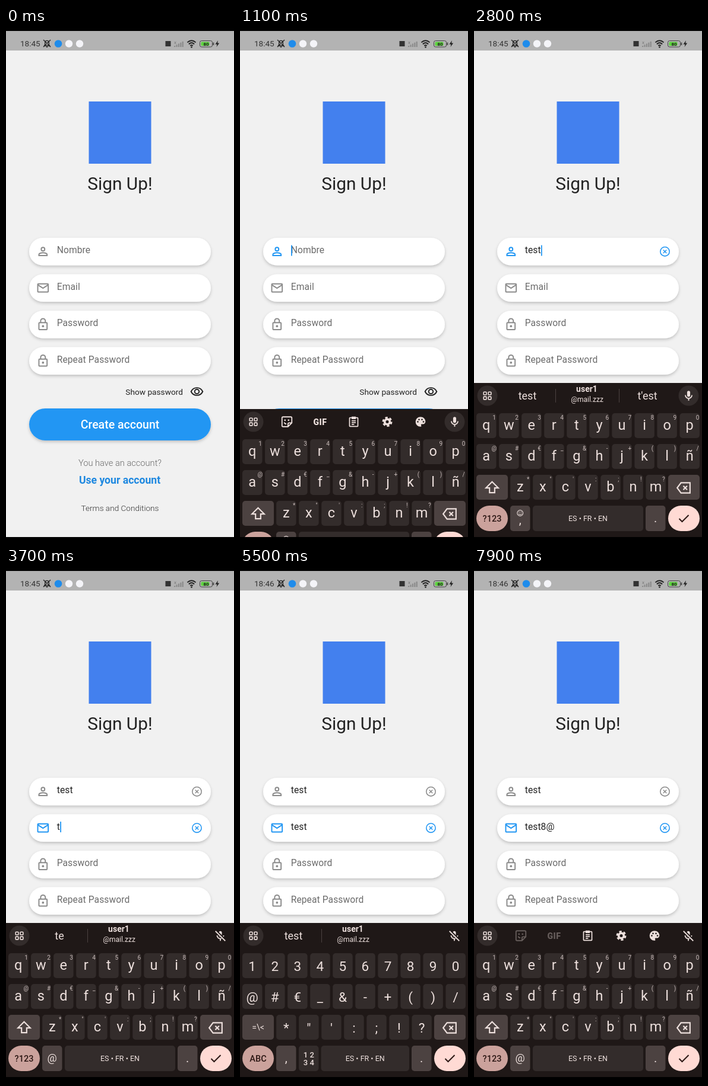
These frames come from a looping animation (384 by 864 pixels, 8 s). An HTML page:

```html
<!DOCTYPE html>
<html lang="en">
<head>
<meta charset="utf-8">
<title>Sign up</title>
<style>
html, body { margin: 0; width: 100%; height: 100%; overflow: hidden; background: #000; }
svg { display: block; width: 384px; height: 864px; font-family: Roboto, "Noto Sans", sans-serif; }
</style>
</head>
<body>
<svg id="stage" viewBox="0 0 384 864"></svg>
<script>
const stage = document.getElementById('stage');
const pen = document.createElement('canvas').getContext('2d');
const BLUE = '#2196f3', GREY = '#8b8b8b', INK = '#222', LIGHT = '#ede0dd';
const KEY = '#332c2b', MOD = '#4c4241', PRESSED = '#5a504e', BOARD = '#1f1817';
const LOOP = 8000, STEP = 100, SPACING = .1;

// Typed characters per field, with the time each one appears
const fields = [
  { hint: 'Nombre', icon: 'person', focus: 800, typed: [[1900, 't'], [2100, 'e'], [2300, 's'], [2600, 't']] },
  { hint: 'Email', icon: 'mail', focus: 3200, typed: [[3700, 't'], [3900, 'e'], [4200, 's'], [4600, 't'], [5900, '8'], [7000, '@']] },
  { hint: 'Password', icon: 'lock', focus: Infinity, typed: [] },
  { hint: 'Repeat Password', icon: 'lock', focus: Infinity, typed: [] }
];
const SYMBOLS_ON = 5100, SYMBOLS_OFF = 7400, CLOCK_TICK = 4600;
const presses = [...fields.flatMap(f => f.typed), [SYMBOLS_ON, '?123'], [SYMBOLS_OFF, 'ABC']];

const dot = (x, y, r) => `<circle cx="${x}" cy="${y}" r="${r}" fill="currentColor" stroke="none"/>`;
const MIC = '<rect x="9.2" y="3" width="5.6" height="11" rx="2.8" fill="currentColor" stroke="none"/><path d="M6 11a6 6 0 0 0 12 0M12 17v4"/>';
const icons = {
  person: '<circle cx="12" cy="8" r="3"/><path d="M5 19v-2c0-1.7 4-3 7-3s7 1.3 7 3v2z"/>',
  mail: '<rect x="3" y="5" width="18" height="14" rx="1"/><path d="M3 6.5l9 6 9-6"/>',
  lock: '<rect x="5" y="9" width="14" height="12" rx="1"/><path d="M8 9V6a4 4 0 0 1 8 0v3"/>' + dot(12, 15, 1.9),
  clear: '<circle cx="12" cy="12" r="8.4"/><path d="M9 9l6 6m0-6l-6 6"/>',
  eye: '<path d="M2 12c4-8.7 16-8.7 20 0-4 8.7-16 8.7-20 0z"/><circle cx="12" cy="12" r="3.8"/>',
  bell: '<path d="M5 18h14l-2-3v-5a5 5 0 0 0-10 0v5zM10 21h4M3 3l18 18M21 3L3 21"/>',
  wifi: '<path d="M2 9q10-9 20 0M5.5 13q6.5-6 13 0M9 17q3-3 6 0" stroke-width="2.8"/>' + dot(12, 20, 1.8),
  grid: [4, 14].map(x => [4, 14].map(y => `<rect x="${x}" y="${y}" width="6" height="6" rx="1"/>`).join('')).join(''),
  sticker: '<path d="M5 3h14a2 2 0 0 1 2 2v9l-7 7H5a2 2 0 0 1-2-2V5a2 2 0 0 1 2-2zM14 21v-5a2 2 0 0 1 2-2h5M7 13q1 3 4 3"/>' + dot(8.5, 9, 1.5) + dot(15, 9, 1.5),
  clipboard: '<rect x="4" y="4" width="16" height="17" rx="1"/><path d="M8 10h8M8 13.5h8M8 17h5"/><rect x="8" y="2" width="8" height="5" fill="currentColor" stroke="none"/>',
  gear: '<circle cx="12" cy="12" r="5.2" stroke-width="4.4"/><circle cx="12" cy="12" r="8.5" stroke-width="3.4" stroke-dasharray="5 3.9"/>',
  palette: '<path fill="currentColor" stroke="none" d="M12 2a10 10 0 0 0 0 20c1 0 1.7-.8 1.7-1.7 0-1-.7-1.2-.7-2 0-.9.7-1.6 1.6-1.6H17a5 5 0 0 0 5-5C22 6 17.5 2 12 2z"/>'
    + `<g color="${BOARD}">` + dot(6.5, 12, 1.6) + dot(9, 7.5, 1.6) + dot(15, 7.5, 1.6) + dot(18, 12, 1.6) + '</g>',
  mic: MIC,
  micOff: MIC + `<path d="M3 2l19 19" stroke="${BOARD}" stroke-width="5"/><path d="M3 3l18 18"/>`,
  shift: '<path d="M12 3L2.5 12.5H8V20h8v-7.5h5.5z"/>',
  erase: '<path d="M8 4h14v16H8l-6-8zM11.5 9l6 6m0-6l-6 6"/>',
  check: '<path d="M4 12l5 5L20 6"/>',
  smile: '<circle cx="12" cy="12" r="9"/><path d="M7 14q5 5 10 0"/>' + dot(9, 9, 1.4) + dot(15, 9, 1.4)
};

const esc = s => s.replace(/&/g, '&amp;').replace(/</g, '&lt;');
const rect = (x, y, w, h, fill, r = 0, extra = '') =>
  `<rect x="${x}" y="${y}" width="${w}" height="${h}" rx="${r}" fill="${fill}" ${extra}/>`;
const disc = (x, y, r, fill) => `<circle cx="${x}" cy="${y}" r="${r}" fill="${fill}"/>`;
const text = (s, x, y, size, fill, extra = '', anchor = 'middle') =>
  `<text x="${x}" y="${y}" font-size="${size}" fill="${fill}" text-anchor="${anchor}" ${extra}>${esc(s)}</text>`;
const icon = (name, x, y, size, color, width = 2) =>
  `<g transform="translate(${x - size / 2} ${y - size / 2}) scale(${size / 24})" fill="none" color="${color}" stroke="currentColor" stroke-width="${width}">${icons[name]}</g>`;

function statusBar(t) {
  let bars = '';
  for (let i = 0; i < 5; i++) bars += rect(283 + i * 3.4, 30 - i * 1.8, 2.2, 2 + i * 1.8, '#8b8b8b');
  return rect(0, 5, 384, 33, '#b3b3b3')
    + text(t < CLOCK_TICK ? '18:45' : '18:46', 24, 31, 13.5, '#333', '', 'start')
    + icon('bell', 69, 26, 16, INK)
    + disc(88, 26.5, 6.3, '#1f8ceb') + disc(106, 26.5, 6.2, '#f4f4f8') + disc(124, 26.5, 6.2, '#f4f4f8')
    + rect(268.5, 22, 9, 9, '#333')
    + bars + text('x', 285, 27, 8, '#777')
    + icon('wifi', 312.5, 26.5, 17, INK)
    + rect(326.5, 21.5, 21, 10.5, 'none', 3, 'stroke="#444"') + rect(328.5, 23.5, 14, 6.5, '#5bd33c', 1.5)
    + rect(348.5, 24.5, 1.8, 4.5, '#444') + text('80', 337, 29.8, 8, INK, 'font-weight="700"')
    + '<path d="M357 21l-4.5 6.5h3l-1 4.5 4.7-6.5h-3z" fill="#222"/>';
}

function field(f, i, t, active, value, lastEvent) {
  const y = 354 + i * 61.5, mid = y + 23.2, focused = f === active;
  const color = focused ? BLUE : GREY;
  let out = rect(39, y, 306, 46.6, '#fff', 23.3, 'filter="url(#soft)"')
    + icon(f.icon, 62.3, mid, 23.5, color)
    + text(value || f.hint, 85.7, y + 26.4, 15.6, value ? INK : '#6b6b6b', `letter-spacing="${SPACING}"`, 'start');
  if (value) out += icon('clear', 321.5, mid, 22, color, 1.7);
  if (focused && Math.floor((t - lastEvent) / 500) % 2 === 0) {
    pen.font = '15.6px Roboto, "Noto Sans", sans-serif';
    const end = 86 + pen.measureText(value).width + value.length * SPACING;
    out += rect(end, y + 12.5, 1.8, 18, BLUE);
  }
  return out;
}

function form(t, active, values, lastEvent) {
  return rect(0, 5, 384, 854, '#f1f1f1') + statusBar(t)
    + rect(139.5, 124, 105, 105, '#4380ee')
    + text('Sign Up!', 192, 273, 29.8, INK)
    + fields.map((f, i) => field(f, i, t, active, values[i], lastEvent)).join('')
    + text('Show password', 298, 618.5, 13.7, INK, '', 'end') + icon('eye', 321.5, 613.5, 23.5, INK)
    + rect(39, 642, 306, 54, BLUE, 27, 'filter="url(#soft)"')
    + text('Create account', 192, 676, 19.5, '#fff', 'font-weight="500"')
    + text('You have an account?', 192, 739, 14.65, '#6a6a6a', 'font-weight="300"')
    + text('Use your account', 191.5, 769, 17.6, '#1e88e0', 'font-weight="700"')
    + text('Terms and Conditions', 192, 815, 13.6, '#333', 'font-weight="300"');
}

function toolbar(email, value) {
  let out = disc(22.5, 620.5, 17, KEY) + icon('grid', 22.5, 620.5, 19, LIGHT);
  out += email ? icon('micOff', 361, 621, 22, LIGHT)
    : disc(361.5, 620.5, 17, KEY) + icon('mic', 361.5, 620.5, 22, LIGHT);
  if (!value || value.endsWith('@')) {
    const shade = email ? '#665d5b' : LIGHT;
    return out + icon('sticker', 79, 620.5, 22, shade)
      + text('GIF', 135, 625.5, 14, shade, 'font-weight="900" letter-spacing=".5"')
      + icon('clipboard', 191.5, 620.5, 21, LIGHT) + icon('gear', 248, 620.5, 20, LIGHT)
      + icon('palette', 304, 620.5, 20, LIGHT);
  }
  out += text(email && value === 't' ? 'te' : value, 90, 627, 18, LIGHT)
    + rect(137, 609, 1, 23, '#4a4241')
    + text('user1', 190, 613.5, 14, LIGHT, 'font-weight="700"')
    + text('@mail.zzz', 190.5, 630.5, 12, LIGHT);
  if (!email) out += rect(244, 609, 1, 23, '#4a4241') + text("t'est", 292, 627, 18, LIGHT);
  return out;
}

function keyboard(t, email, value) {
  const symbols = t >= SYMBOLS_ON && t < SYMBOLS_OFF;
  const hit = presses.find(p => t >= p[0] - STEP && t < p[0]);
  const down = hit && hit[1];
  const marks = ['1234567890', '@#€_&-+()/', '*"\':;!?'];
  const rows = symbols ? marks : ['qwertyuiop', 'asdfghjklñ', 'zxcvbnm'];
  let out = rect(0, 599, 384, 262, BOARD) + toolbar(email, value);
  rows.forEach((row, r) => [...row].forEach((c, i) => {
    const x = 4 + (r === 2 ? i + 1.5 : i) * 38.05, y = 650 + r * 52;
    out += rect(x, y, 33.5, 42, c === down ? PRESSED : KEY, 5)
      + text(c, x + 16.7, y + (symbols ? 29.5 : 28), symbols ? 22.5 : 23.5, LIGHT);
    if (!symbols) out += text(marks[r][i], x + 30, y + 11, 10, '#c9bcba');
  }));
  out += rect(4, 754, 53, 42, MOD, 5) + rect(327, 754, 53, 42, MOD, 5)
    + (symbols ? text('=\\<', 30.5, 780, 14, LIGHT) : icon('shift', 30.5, 775.5, 26, LIGHT))
    + icon('erase', 353, 776, 26, LIGHT);

  const mode = symbols ? 'ABC' : '?123', comma = symbols || !email;
  out += rect(4, 806, 53, 43, mode === down ? '#e6c3bd' : '#cba29c', 21.5)
    + text(mode, 30.5, 832.5, 14.5, '#2b1613', 'font-weight="500"')
    + rect(61, 806, 33.5, 43, MOD, 5)
    + (comma ? text(',', 77.7, symbols ? 834 : 837, 20, LIGHT) : text('@', 77.7, 833, 18, LIGHT));
  if (!email) out += icon('smile', 77.7, 818.5, 13, LIGHT);
  if (symbols) out += rect(99, 806, 33.5, 43, KEY, 5)
    + text('1 2', 115.8, 826, 13, LIGHT, 'font-weight="500"') + text('3 4', 115.8, 839, 13, LIGHT, 'font-weight="500"');
  const left = symbols ? 136.5 : 99;
  return out + rect(left, 806, 285 - left, 43, KEY, 5)
    + text('ES • FR • EN', symbols ? 210.7 : 192, 832, 12.5, LIGHT)
    + rect(289, 806, 33.5, 43, MOD, 5) + text('.', 305.7, 834, 20, LIGHT)
    + rect(327, 806, 53, 43, '#ffdad4', 21.5) + icon('check', 353.5, 828, 24, '#2b1613');
}

function scene(t) {
  const active = fields.filter(f => t >= f.focus).pop();
  const values = fields.map(f => f.typed.filter(p => t >= p[0]).map(p => p[1]).join(''));
  const index = fields.indexOf(active);
  const lastEvent = active ? Math.max(active.focus, ...active.typed.map(p => p[0]).filter(p => p <= t)) : 0;
  let out = '<defs><filter id="soft" x="-10%" y="-30%" width="120%" height="180%"><feDropShadow dx="0" dy="2.5" stdDeviation="2.5" flood-opacity=".2"/></filter></defs>'
    + form(t, active, values, lastEvent);
  const rise = (t - 894) / 350;
  if (rise > 0) {
    const drop = Math.round(259 * (1 - Math.min(rise, 1)) ** 2);
    out += `<g transform="translate(0 ${drop})">${keyboard(t, index === 1, values[index])}</g>`;
  }
  return out + rect(0, 859, 384, 5, '#000');
}

let shown = -1;
function tick() {
  const t = Math.floor(performance.now() % LOOP / STEP) * STEP;
  if (t !== shown) stage.innerHTML = scene(shown = t);
  requestAnimationFrame(tick);
}
tick();
</script>
</body>
</html>
```
